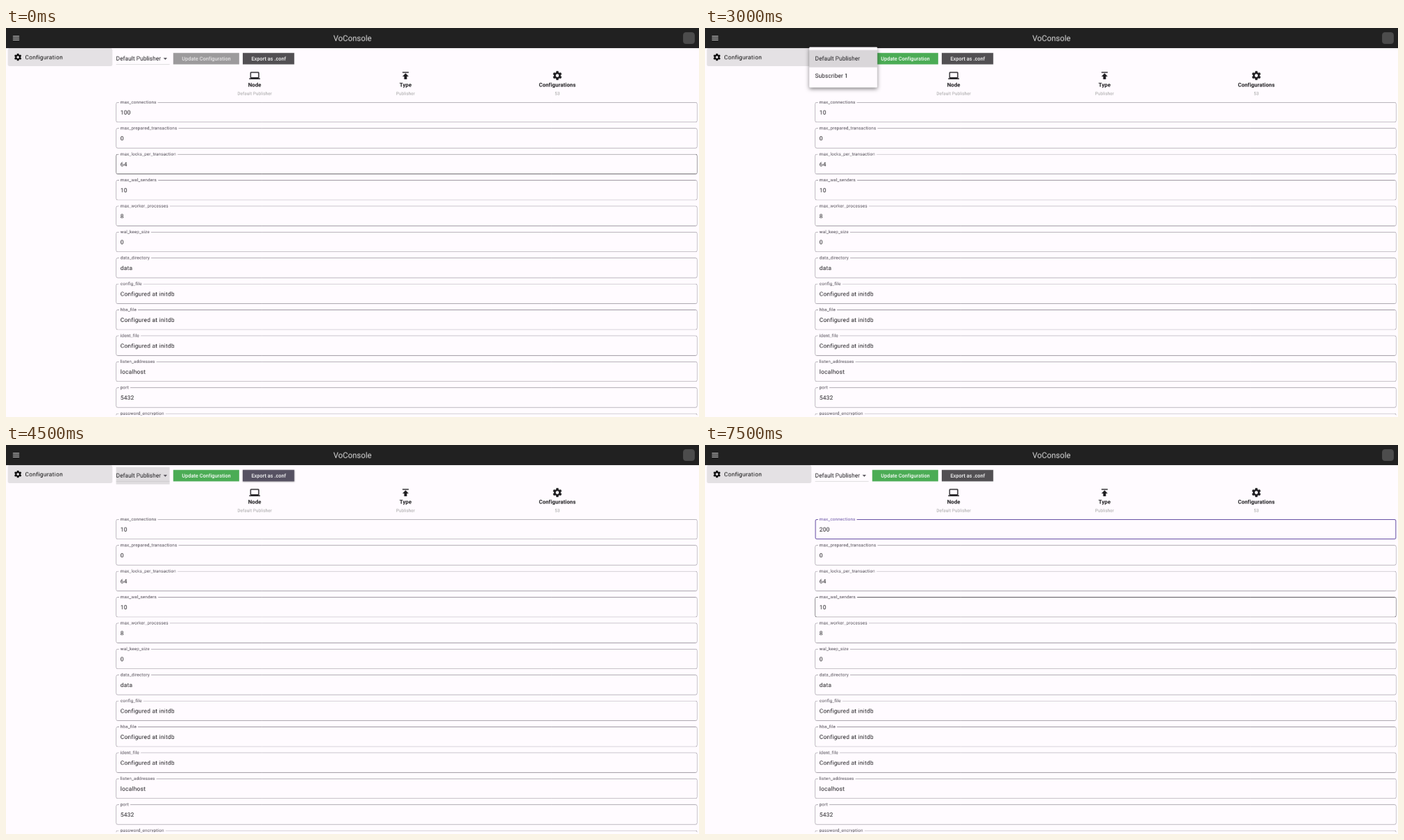
Recreate the animation shown at these times as an HTML page with a canvas. Size 998 px wide and 561 px high, loop 8000 ms.

```html
<!DOCTYPE html>
<html lang="en">
<head>
<meta charset="utf-8">
<title>Configuration manager</title>
<style>
  html, body { margin: 0; width: 100%; height: 100%; overflow: hidden; background: #fffbff; }
  canvas { display: block; width: 998px; height: 561px; }
</style>
</head>
<body>
<canvas></canvas>
<script>
const WIDTH = 1920, HEIGHT = 1080, LOOP = 8000;
const PAGE = '#fffbff', INK = '#1c1b1e', MUTED = '#49454e', OUTLINE = '#7a757f', PRIMARY = '#6750a4';
const GREEN = '#4bac55';

// The app is drawn at full HD, then scaled down smoothly onto the stage.
const ctx = new OffscreenCanvas(WIDTH, HEIGHT).getContext('2d');
const canvas = document.querySelector('canvas');
const ratio = window.devicePixelRatio || 1;
canvas.width = 998 * ratio;
canvas.height = 561 * ratio;
const stage = canvas.getContext('2d');
stage.imageSmoothingQuality = 'high';

const FIELDS = [
  ['max_connections', '100'], ['max_prepared_transactions', '0'],
  ['max_locks_per_transaction', '64'], ['max_wal_senders', '10'],
  ['max_worker_processes', '8'], ['wal_keep_size', '0'],
  ['data_directory', 'data'], ['config_file', 'Configured at initdb'],
  ['hba_file', 'Configured at initdb'], ['ident_file', 'Configured at initdb'],
  ['listen_addresses', 'localhost'], ['port', '5432'], ['password_encryption', ''],
];

const SCENES = [
  { at: 0, connections: '100', hovered: 2, button: '#9c9a9c' },
  { at: 1500, connections: '10', hovered: 0, caret: true },
  { at: 3000, connections: '10', menu: true },
  { at: 4500, connections: '10', selectFocused: true, exportHovered: true },
  { at: 6000, dialog: true },
  { at: 7500, connections: '200', focused: 0, hovered: 3 },
];

const LAPTOP = new Path2D('M20 18c1.1 0 2-.9 2-2V6c0-1.1-.9-2-2-2H4c-1.1 0-2 .9-2 2v10c0 1.1.9 2 2 2H0v2h24v-2zM4 6h16v10H4z');
const PUBLISH = new Path2D('M5 4v2h14V4zm0 10h4v6h6v-6h4l-7-7z');
const DROP_ARROW = new Path2D('M7 10l5 5 5-5z');
const GEAR_TOOTH = new Path2D('M-2.4-9.5Q-2.3-10-1.9-10H1.9Q2.3-10 2.4-9.5L2.9-5H-2.9Z');

function setFont(size, spacing = 0, weight = 400) {
  ctx.font = `${weight} ${size}px Roboto, sans-serif`;
  ctx.letterSpacing = spacing + 'px';
  ctx.textRendering = 'geometricPrecision';
}

function text(string, x, y, size, color = INK, { spacing, weight, align = 'left' } = {}) {
  setFont(size, spacing, weight);
  ctx.textAlign = align;
  ctx.fillStyle = color;
  ctx.fillText(string, x, y);
}

function box(x, y, width, height, color, radius = 0) {
  ctx.fillStyle = color;
  ctx.beginPath();
  ctx.roundRect(x, y, width, height, radius);
  ctx.fill();
}

function withShadow(offset, blur, alpha, draw) {
  ctx.save();
  ctx.shadowColor = `rgba(0,0,0,${alpha})`;
  ctx.shadowOffsetY = offset;
  ctx.shadowBlur = blur;
  draw();
  ctx.restore();
}

// Draws on a 24-unit grid centred on x, y.
function icon(path, x, y, size, color) {
  ctx.save();
  ctx.translate(x, y);
  ctx.scale(size / 24, size / 24);
  ctx.translate(-12, -12);
  ctx.fillStyle = color;
  ctx.fill(path, 'evenodd');
  ctx.restore();
}

function gear(x, y, size, color) {
  ctx.save();
  ctx.translate(x, y);
  ctx.scale(size / 24, size / 24);
  ctx.fillStyle = ctx.strokeStyle = color;
  ctx.lineWidth = 3.9;
  ctx.beginPath();
  ctx.arc(0, 0, 5.5, 0, 2 * Math.PI);
  ctx.stroke();
  for (let tooth = 0; tooth < 6; tooth++) {
    ctx.fill(GEAR_TOOTH);
    ctx.rotate(Math.PI / 3);
  }
  ctx.restore();
}

function drawFrame() {
  box(0, 0, WIDTH, HEIGHT, PAGE);
  box(0, 0, WIDTH, 56, '#212121');
  for (const y of [22, 27, 32]) box(19, y, 18, 2, '#dcdcdc');
  text('VoConsole', 960, 36, 22, '#dcdcdc', { align: 'center' });
  box(1876, 12, 32, 32, '#4c4c4c', 7);

  box(5, 56, 290, 50, '#e4e1e4', 5);
  gear(33, 81, 24, '#000');
  text('Configuration', 53, 87, 16, '#000', { spacing: 0.65 });
}

function drawSelect(focused) {
  if (focused) box(305, 61, 148.3, 48, '#dfdcdf');
  box(305, 100, 148.3, 1, '#bdbdbd');
  text('Default Publisher', 305, 90, 16, INK, { spacing: 0.15 });
  icon(DROP_ARROW, 441.3, 85, 24, MUTED);
}

function drawButtons({ button = GREEN, exportHovered }) {
  const label = { spacing: 0.1, weight: 500 };
  box(463.3, 69, 182.6, 32, button);
  text('Update Configuration', 487.3, 90, 14, button === GREEN ? '#fff' : '#e8e6e8', label);
  withShadow(1, 4, exportHovered ? 0.4 : 0, () =>
    box(655.9, 69, 142.9, 32, exportHovered ? '#565162' : '#525053'));
  text('Export as .conf', 679.9, 90, 14, '#fff', label);
}

function drawSummary() {
  icon(LAPTOP, 689, 132, 30, INK);
  icon(PUBLISH, 1107, 132, 30, INK);
  gear(1527.5, 132, 30, INK);
  const columns = [
    [689, 'Node', 'Default Publisher'],
    [1107, 'Type', 'Publisher'],
    [1527.5, 'Configurations', '53'],
  ];
  for (const [x, title, detail] of columns) {
    text(title, x, 163, 15, INK, { spacing: 0.15, weight: 700, align: 'center' });
    text(detail, x, 186, 12, '#9e9e9e', { spacing: 0.25, align: 'center' });
  }
}

function drawField(index, { connections, hovered, focused, caret }) {
  const [label, initial] = FIELDS[index];
  const value = index === 0 ? connections : initial;
  const y = 206 + 72 * index;
  const isFocused = index === focused;
  const line = isFocused ? 2 : 1;

  ctx.strokeStyle = isFocused ? PRIMARY : index === hovered ? INK : OUTLINE;
  ctx.lineWidth = line;
  ctx.beginPath();
  ctx.roundRect(305 + line / 2, y + line / 2, 1610 - line, 56 - line, 4);
  ctx.stroke();

  setFont(12, 0.375);
  box(313, y - 1, ctx.measureText(label).width + 8, 4, PAGE);
  text(label, 317, y + 4, 12, isFocused ? PRIMARY : MUTED, { spacing: 0.375 });
  text(value, 317, y + 34, 16, INK, { spacing: 0.5 });
  if (index === 0 && caret) box(336, y + 16, 2, 24, PRIMARY);
}

function drawMenu() {
  withShadow(4, 12, 0.5, () => box(289, 53, 188.3, 112, PAGE, 2));
  box(289, 61, 188.3, 48, '#d9d6d9');
  text('Default Publisher', 305, 90, 16, INK, { spacing: 0.15 });
  text('Subscriber 1', 305, 138, 16, INK, { spacing: 0.15 });
}

function drawDialog() {
  box(970, 432, 280, 272, '#eee8f4', 28);
  text('Success', 994, 480, 24);
  const body = { spacing: 0.25 };
  ['node : Default Publisher', 'configuration : max_connections', 'value : 10'].forEach((line, i) =>
    text(line, 994, 519 + 20 * i, 14, MUTED, body));
  text('Reloading configuration...', 998, 619, 14, INK, body);
  text('OK', 1188.5, 669, 14, PRIMARY, { spacing: 0.1 });
}

function drawSettings(scene) {
  ctx.save();
  ctx.beginPath();
  ctx.rect(0, 0, WIDTH, 1075);
  ctx.clip();
  drawSelect(scene.selectFocused);
  drawButtons(scene);
  drawSummary();
  FIELDS.forEach((_, index) => drawField(index, scene));
  if (scene.menu) drawMenu();
  ctx.restore();
}

function render(now) {
  const time = now % LOOP;
  const scene = SCENES.findLast(({ at }) => at <= time) || SCENES[0];
  drawFrame();
  if (scene.dialog) drawDialog();
  else drawSettings(scene);
  stage.drawImage(ctx.canvas, 0, 0, canvas.width, canvas.height);
  requestAnimationFrame(() => render(performance.now()));
}
render(0);
</script>
</body>
</html>
```
